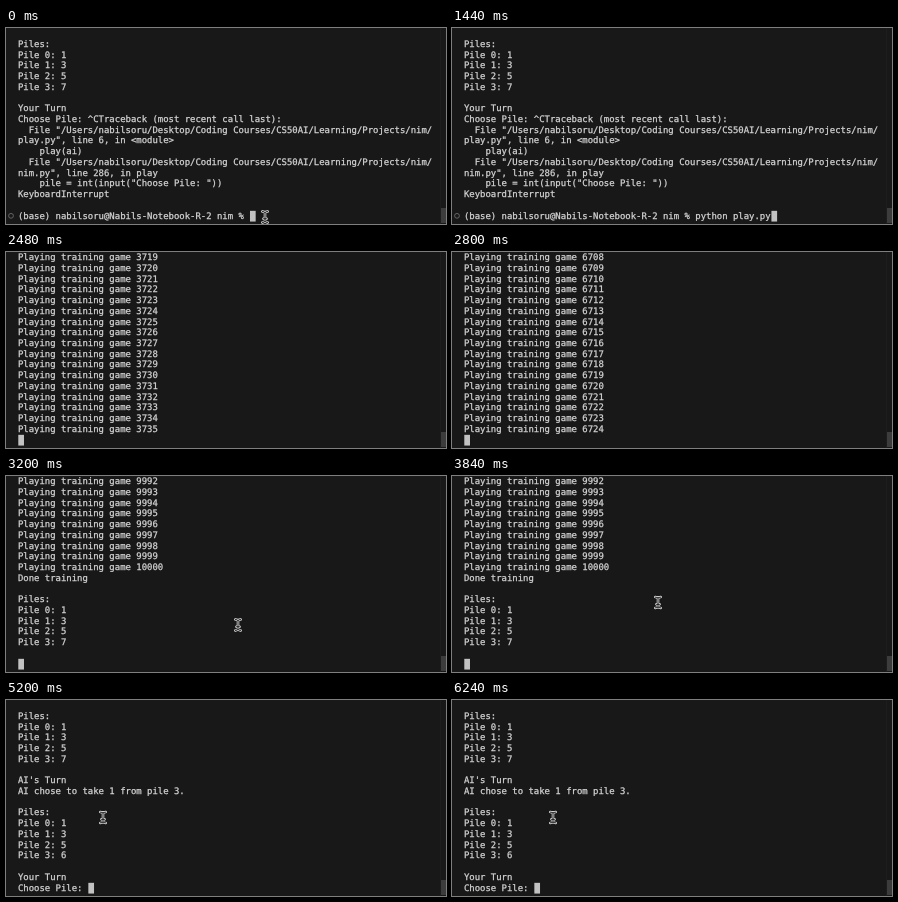
Write an HTML page with a canvas that moves like this. It is 440x196 px and loops after 8 s.

```html
<!DOCTYPE html>
<html lang="en">
<head>
<meta charset="utf-8">
<title>Nim in the terminal</title>
<style>
  html, body { margin: 0; width: 100%; height: 100%; overflow: hidden; background: #181818; }
  canvas { display: block; }
</style>
</head>
<body>
<canvas id="stage" width="440" height="196"></canvas>
<script>
const ctx = document.getElementById('stage').getContext('2d');
const LOOP = 8000, STEP = 80;
const ROWS = 18, LEFT = 11.9, TOP = 0.5, LINE = 10.725, CHAR = 5.388;
const TYPED = 1440, RUN = 2080, TRAINED = 3200, AI_MOVE = 4160, YOUR_TURN = 5200;
const GAMES_PER_MS = 9.339;

const piles = last => ['', 'Piles:', ...[1, 3, 5, last].map((n, i) => `Pile ${i}: ${n}`), ''];
const game = n => `Playing training game ${n}`;
const DIR = '  File "/Users/nabilsoru/Desktop/Coding Courses/CS50AI/Learning/Projects/nim/';
const PROMPT = '(base) nabilsoru@Nabils-Notebook-R-2 nim % ';
const HISTORY = [
  ...piles(7),
  'Your Turn',
  'Choose Pile: ^CTraceback (most recent call last):',
  DIR,
  'play.py", line 6, in <module>',
  '    play(ai)',
  DIR,
  'nim.py", line 286, in play',
  '    pile = int(input("Choose Pile: "))',
  'KeyboardInterrupt',
  ''
];

// Everything printed so far; the text cursor follows the last line.
function printed(t) {
  const log = [...HISTORY, PROMPT + (t >= TYPED ? 'python play.py' : '')];
  if (t < RUN) return log;
  const played = t >= TRAINED ? 10000 : Math.floor((t - RUN) * GAMES_PER_MS);
  for (let n = Math.max(1, played - ROWS); n <= played; n++) log.push(game(n));
  if (t >= TRAINED) log.push('Done training', ...piles(7));
  if (t >= AI_MOVE) log.push("AI's Turn", 'AI chose to take 1 from pile 3.', ...piles(6));
  if (t >= YOUR_TURN) log.push('Your Turn', 'Choose Pile: ');
  else log.push('');
  return log;
}

// Pointer path as [time, x, y]; it is hidden from typing until it moves again.
const PATH = [
  [3120, 242, 160], [3200, 232, 149], [3360, 219, 137], [3760, 207, 126.5],
  [3840, 206, 126.5], [3920, 206, 126.5], [4000, 201, 126], [4160, 157, 122],
  [4320, 104, 118], [4400, 97, 117.5], [5280, 97, 117.5], [5440, 99, 117.5],
  [6080, 99, 117.5], [6240, 101, 117.5], [LOOP, 101, 117.5]
];

function pointerAt(t) {
  if (t < TYPED) return [259, 189];
  if (t < PATH[0][0]) return null;
  const i = PATH.findIndex(p => p[0] > t);
  const [t0, x0, y0] = PATH[i - 1], [t1, x1, y1] = PATH[i];
  const k = (t - t0) / (t1 - t0);
  return [x0 + (x1 - x0) * k, y0 + (y1 - y0) * k];
}

const beam = new Path2D(
  'M-2.6-5.4Q-.4-5.4 0-4.4Q.4-5.4 2.6-5.4M0-4.4V4.4M-2.6 5.4Q-.4 5.4 0 4.4Q.4 5.4 2.6 5.4M-1.5 1.8H1.5');

function drawPointer([x, y]) {
  ctx.save();
  ctx.translate(x, y);
  ctx.lineCap = 'round';
  for (const [color, width] of [['#f2f2f2', 2.5], ['#111', 1]]) {
    ctx.strokeStyle = color;
    ctx.lineWidth = width;
    ctx.stroke(beam);
  }
  ctx.restore();
}

function rect(color, x, y, w, h) {
  ctx.fillStyle = color;
  ctx.fillRect(x, y, w, h);
}

function drawRow(text, row) {
  const y = TOP + row * LINE;
  ctx.fillStyle = ctx.strokeStyle = '#d6d6d6';
  ctx.lineWidth = 0.25;
  ctx.fillText(text, LEFT, y + 7.7);
  ctx.strokeText(text, LEFT, y + 7.7);
  if (text.startsWith(PROMPT)) {
    ctx.strokeStyle = '#6a6a6a';
    ctx.lineWidth = 0.9;
    ctx.beginPath();
    ctx.arc(5, y + 5, 2.4, 0, 2 * Math.PI);
    ctx.stroke();
  }
}

function draw(t) {
  rect('#181818', 0, 0, 440, 196);
  rect('#1d1d1d', 434, 0, 1, 196);
  rect('#3c3c3c', 435, 180, 5, 15);

  ctx.font = '8.95px "DejaVu Sans Mono", monospace';
  ctx.textRendering = 'geometricPrecision';
  const rows = printed(t).slice(-ROWS);
  rows.forEach((text, i) => drawRow(text, i + ROWS - rows.length));
  const cursorX = LEFT + 0.4 + rows.at(-1).length * CHAR;
  rect('#c2c2c2', cursorX, TOP + (ROWS - 1) * LINE, CHAR + 0.3, LINE);

  const pointer = pointerAt(t);
  if (pointer) drawPointer(pointer);
}

const start = performance.now();
function tick() {
  const t = (performance.now() - start) % LOOP;
  draw(Math.floor(t / STEP) * STEP);
  requestAnimationFrame(tick);
}
tick();
</script>
</body>
</html>
```
